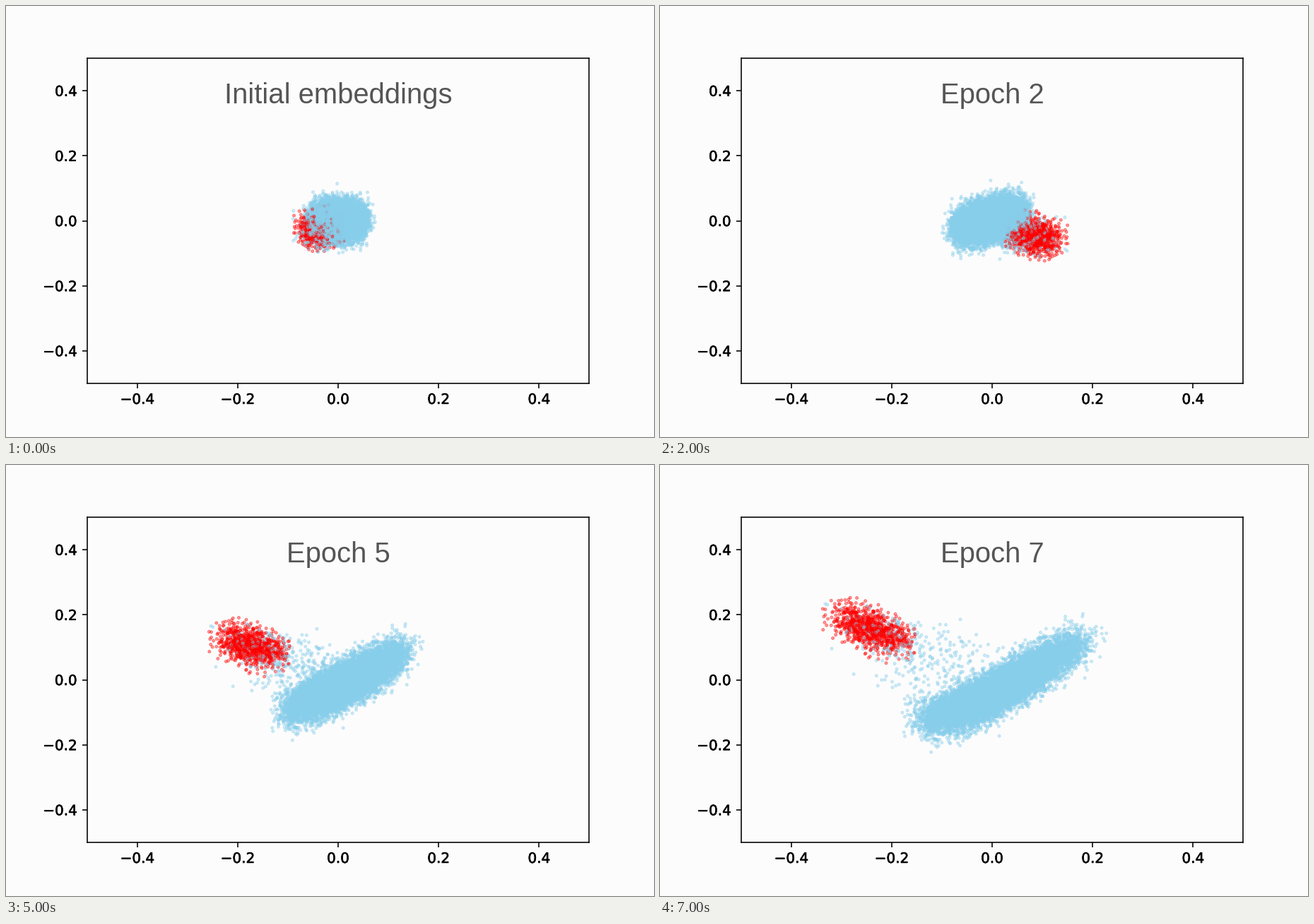
A matplotlib script that plays this animation: 917 by 611 pixels, repeating every 8000 ms.

```python
import numpy as np
import matplotlib.pyplot as plt
from matplotlib import patheffects
from matplotlib.animation import FuncAnimation

W, H, DPI = 917, 611, 128
PX = 72 / DPI  # points per pixel
BG = "#fcfcfc"
EPOCHS = 8
N_BLUE, N_BRIDGE, N_RED = 13600, 400, 900

rng = np.random.default_rng(7)
total = N_BLUE + N_BRIDGE + N_RED
u, v = rng.normal(size=(2, total))
u = 3 * np.tanh(u / 3)  # shorten the tails
bridge = slice(N_BLUE, N_BLUE + N_BRIDGE)
mix = np.zeros(total)  # 0 = blue cloud, 1 = red cloud
mix[N_BLUE + N_BRIDGE:] = 1
mix[bridge] = rng.uniform(0, 1, N_BRIDGE)
u[bridge] -= .4
v[bridge] += .5
colors = np.where(mix == 1, "red", "skyblue")

# Shuffle so that both colours are stacked at random depth.
order = rng.permutation(total)
u, v, mix, colors = u[order], v[order], mix[order], colors[order]


def blue_cloud(t):
    """A round blob that stretches into a bent band."""
    x = .02 * t + (.028 + .051 * t**1.5) * u
    slope = .82 * np.sin(np.pi / 2 * t)
    curve = slope * x + 1.3 * t**2 * x**2 - 6 * t**4 * x**3
    return np.column_stack([x, curve - .045 * t**2 + (.027 + .006 * t) * v])


def red_cloud(t):
    """A blob that drifts up and left, tilting as it grows."""
    dx = (.023 + .019 * t) * u
    dy = -.5 * t * dx + (.025 + .005 * t) * v
    x = -.035 - .16 * t - .045 * t**2
    y = .025 + .06 * t + .07 * t**2
    return np.column_stack([x + dx, y + dy])


def positions(epoch):
    t = epoch / (EPOCHS - 1)
    m = mix[:, None]
    # The projection axes change sign between some epochs.
    flip_x = -1 if 1 <= epoch < 5 else 1
    flip_y = 1 if epoch == 1 or epoch >= 5 else -1
    return ((1 - m) * blue_cloud(t) + m * red_cloud(t)) * (flip_x, flip_y)


fig = plt.figure(figsize=(W / DPI, H / DPI), dpi=DPI, facecolor=BG)
left, right, top, bottom = 114.8, 825.4, 74, 535
ax = fig.add_axes([left / W, 1 - bottom / H,
                   (right - left) / W, (bottom - top) / H], facecolor=BG)
ticks = np.linspace(-.4, .4, 5)
ax.set(xlim=(-.5, .5), ylim=(-.5, .5), xticks=ticks, yticks=ticks)
ax.tick_params(length=7 * PX, width=1.6 * PX, pad=7 * PX, labelsize=20 * PX)
for spine in ax.spines.values():
    spine.set_linewidth(1.6 * PX)
bolder = [patheffects.withStroke(linewidth=.6 * PX, foreground="black")]
for label in ax.get_xticklabels() + ax.get_yticklabels():
    label.set_fontfamily("DejaVu Sans")
    label.set_path_effects(bolder)

dots = ax.scatter(*positions(0).T, s=(4 * PX)**2, c=colors, alpha=.4,
                  linewidths=PX)
title = fig.text(470.7 / W, 1 - 138 / H, "", fontfamily="Liberation Sans",
                 fontsize=40 * PX, color="#555555", ha="center", va="baseline")


def update(epoch):
    dots.set_offsets(positions(epoch))
    title.set_text(f"Epoch {epoch}" if epoch else "Initial embeddings")
    return dots, title


anim = FuncAnimation(fig, update, frames=EPOCHS, interval=1000,
                     repeat=True, repeat_delay=0, blit=False)
plt.show()
```
